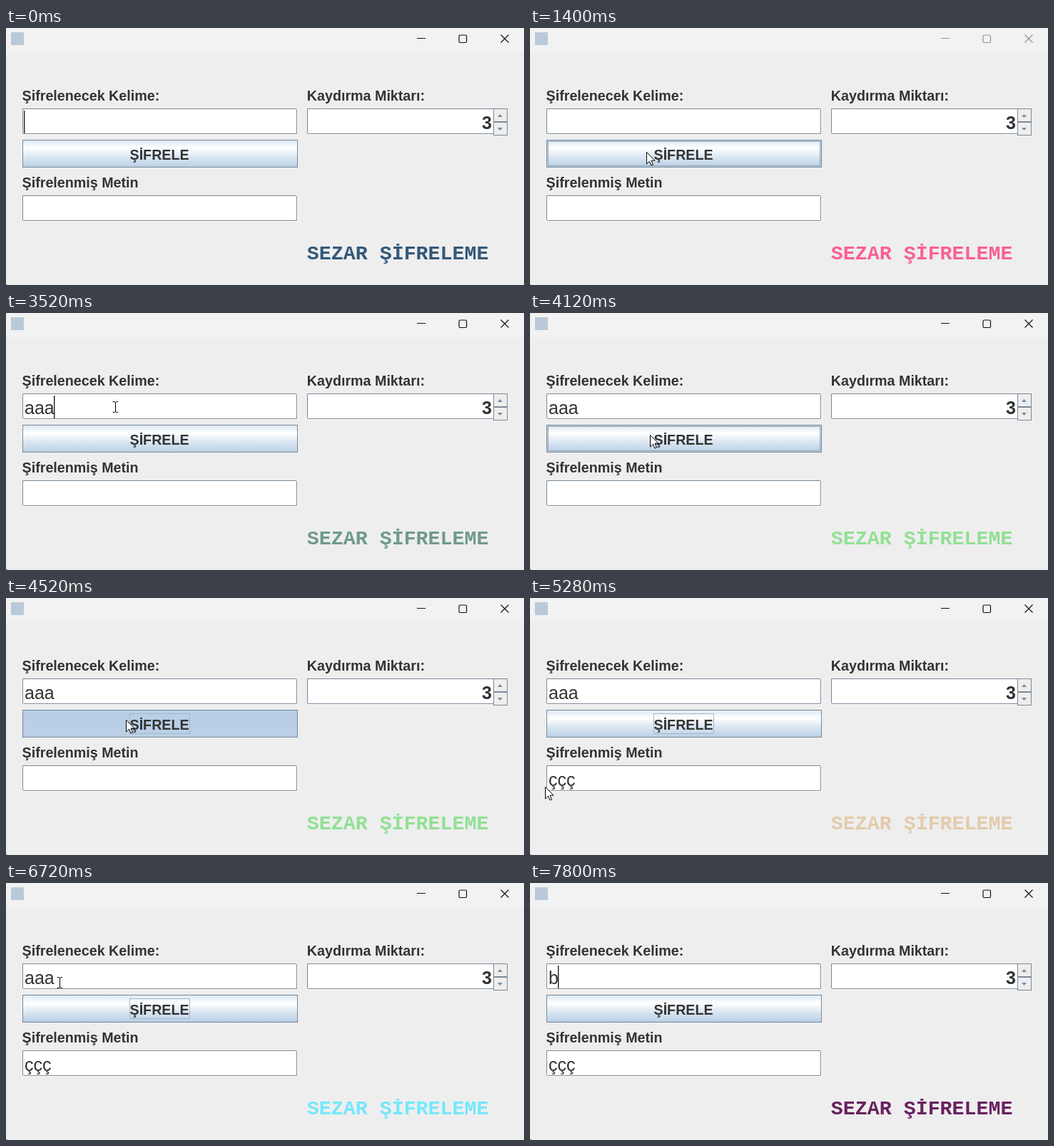
An HTML page that plays this animation: 726x361 px, repeating every 8 s.

```html
<!DOCTYPE html>
<html lang="tr">
<head>
<meta charset="utf-8">
<title>Sezar</title>
<style>
  html, body { margin: 0; width: 100%; height: 100%; overflow: hidden; background: #eee; }
  svg { display: block; width: 726px; height: 361px; }
  text { fill: #333; white-space: pre; }
  .label { font: bold 19.7px "Liberation Sans", Arial, sans-serif; }
  .value { font: 25px "Liberation Sans", Arial, sans-serif; }
  .bold { font-weight: bold; }
  .heading { font: bold 28.3px "Liberation Mono", "DejaVu Sans Mono", monospace; }
  .edge { stroke: #7a8a99; }
  .line { fill: none; }
</style>
</head>
<body>
<svg viewBox="0 0 726 361">
  <defs>
    <linearGradient id="metal" x2="0" y2="1">
      <stop stop-color="#dde8f3"/>
      <stop offset=".3" stop-color="#fff"/>
      <stop offset=".6" stop-color="#dde8f3"/>
      <stop offset="1" stop-color="#b8cfe5"/>
    </linearGradient>
  </defs>

  <rect width="726" height="361" fill="#eee"/>
  <rect width="726" height="34" fill="#f2f2f2"/>
  <rect x="7" y="6" width="18" height="18" fill="#b9c9d9"/>
  <g id="controls" class="line" stroke-width="1.2">
    <path d="M576 14.500h12M693.500 9.500l11 11m0-11l-11 11"/>
    <rect x="635" y="10" width="10.500" height="10.500" rx="1.500"/>
  </g>
  <path id="corner" d="M0 358Q0 361 3 361H0z"/>

  <text class="label" x="22.600" y="102">Şifrelenecek Kelime:</text>
  <text class="label" x="421.800" y="102">Kaydırma Miktarı:</text>
  <text class="label" x="22.600" y="224">Şifrelenmiş Metin</text>

  <g id="fields"></g>
  <g class="edge" fill="#eee">
    <rect x="683.500" y="113.500" width="19" height="18"/>
    <rect x="683.500" y="132.500" width="19" height="18"/>
  </g>
  <path d="M689 125l3.500-4 3.500 4zM689 140h7l-3.500 4z" fill="#7a8a99"/>
  <text class="value bold" x="667" y="142">3</text>

  <rect id="button" class="edge" x="23.500" y="157.500" width="385" height="38"/>
  <g id="hover" class="line">
    <rect x="24.500" y="158.500" width="383" height="36" stroke="#b8cfe5"/>
    <rect x="25.500" y="159.500" width="381" height="34" stroke="#7a8a99" stroke-opacity=".65"/>
  </g>
  <rect id="ring" class="line" x="173.500" y="162.500" width="84" height="28" stroke="#a3b8cc"/>
  <text class="label" x="173.500" y="185">ŞİFRELE</text>

  <rect id="selection" y="116" height="31" fill="#b8cfe5"/>
  <text id="input" class="value" x="26" y="142"></text>
  <rect id="caret" y="116" width="1.400" height="32" fill="#222"/>
  <text id="output" class="value" x="26" y="264"></text>
  <text id="heading" class="heading" x="421.800" y="325">SEZAR ŞİFRELEME</text>

  <g id="pointer">
    <path id="arrow" d="M.5.5V17L4.500 13.200 7 19 9.500 18 7 12.200H12z" fill="#fff" stroke="#000"/>
    <path id="beam" class="line" d="M-3.500-7.500H-1L.5-6.500 2-7.500H4M.5-6.500V6.500M-3.500 7.500H-1L.5 6.500 2 7.500H4" stroke="#000"/>
  </g>
</svg>
<script>
const LOOP = 8000, SECOND = 1000, BLINK = 500;
const TEXT_X = 26, CHAR = 13.9;
const $ = Object.fromEntries([...document.querySelectorAll('[id]')].map(e => [e.id, e]));

// The heading takes a new colour every second.
const COLOR_DELAY = 600;
const colors = ['#34587a', '#fa5f96', '#7f5fad', '#6f9a8f', '#92e094',
  '#e3cbab', '#96a08c', '#73e8fb', '#68215f'];

const DEACTIVATE = 280, REACTIVATE = 2000;
const PRESS = 4520, RELEASE = 4640;
const DRAG = 6880, DRAG_END = 7280, REPLACE = 7800;
const keys = [2880, 3120, 3520];
const caretResets = [0, REACTIVATE, ...keys, DRAG, 7100, REPLACE];

// Each move eases from the previous stop to its own.
const ENTER = { end: 440, x: 215, y: 318 };
const moves = [
  { start: 440, end: 800, x: 189, y: 224 },
  { start: 1000, end: 1400, x: 163, y: 174 },
  { start: 1600, end: 2120, x: 153, y: 132 },
  { start: 3560, end: 4120, x: 168, y: 171 },
  { start: RELEASE, end: 5120, x: 21, y: 265 },
  { start: 5280, end: 5800, x: 62, y: 263 },
  { start: 6000, end: 6120, x: 68, y: 180 },
  { start: 6320, end: 6720, x: 75, y: 140 },
  { start: DRAG, end: DRAG_END, x: -14, y: 138 },
];

const clamp = (v, low, high) => Math.max(low, Math.min(high, v));
const ease = k => k * k * (3 - 2 * k);
const between = (v, low, high) => v >= low && v < high;
const inside = ({ x, y }, left, top, right, bottom) =>
  between(x, left, right) && between(y, top, bottom);
const show = (el, on) => el.setAttribute('visibility', on ? 'visible' : 'hidden');
const set = (el, name, value) => el.setAttribute(name, value);

// Sunken box with open corners at top right and bottom left.
function field(x, y, width) {
  const right = x + width, bottom = y + 36;
  return `<path d="M${x} ${y}H${right}V${bottom}H${x}z" fill="#fff"/>
    <path class="line edge" d="M${x + .5} ${bottom - 1}V${y + .5}H${right - 1}
      M${x + 1} ${bottom - .5}H${right - .5}V${y + 1}"/>
    <path class="line" stroke="#fff" d="M${x + 1} ${bottom + .5}H${right + .5}V${y + 1}"/>`;
}
$.fields.innerHTML = field(23, 113, 385) + field(23, 235, 385) + field(422, 113, 262);

function pointerAt(t) {
  let { x, y } = ENTER;
  for (const move of moves) {
    const k = ease(clamp((t - move.start) / (move.end - move.start), 0, 1));
    x += (move.x - x) * k;
    y += (move.y - y) * k;
  }
  return { x: Math.round(x), y: Math.round(y) };
}

function render(t) {
  const active = !between(t, DEACTIVATE, REACTIVATE);
  set($.controls, 'stroke', active ? '#111' : '#929292');
  set($.corner, 'fill', active ? '#777' : '#aaa');
  set($.heading, 'style', `fill:${colors[Math.ceil((t - COLOR_DELAY + 1) / SECOND)]}`);

  const point = pointerAt(t);
  const visible = between(t, ENTER.end, DRAG_END);
  const dragging = t >= DRAG;
  const useBeam = dragging || inside(point, 23, 113, 408, 149) || inside(point, 23, 235, 408, 271);
  set($.pointer, 'transform', `translate(${point.x} ${point.y})`);
  show($.arrow, visible && !useBeam);
  show($.beam, visible && useBeam);

  const pressed = between(t, PRESS, RELEASE);
  const buttonFocus = between(t, PRESS, DRAG);
  set($.button, 'fill', pressed ? '#b8cfe5' : 'url(#metal)');
  show($.hover, visible && !dragging && !pressed && inside(point, 23, 157, 409, 196));
  show($.ring, buttonFocus);

  const text = t >= REPLACE ? 'b' : 'a'.repeat(keys.filter(key => key <= t).length);
  $.input.textContent = text;
  $.output.textContent = t >= RELEASE ? 'ççç' : '';

  const selecting = between(t, DRAG, REPLACE);
  const column = selecting
    ? clamp(Math.round((point.x - TEXT_X) / CHAR), 0, text.length)
    : text.length;
  set($.selection, 'x', TEXT_X + column * CHAR);
  set($.selection, 'width', (text.length - column) * CHAR);
  show($.selection, selecting);

  const sinceReset = t - caretResets.findLast(reset => reset <= t);
  const lit = sinceReset % (2 * BLINK) < BLINK;
  set($.caret, 'x', TEXT_X - 1 + Math.round(column * CHAR));
  show($.caret, active && !buttonFocus && lit);
}

const start = performance.now();
function tick() {
  render((performance.now() - start) % LOOP);
  requestAnimationFrame(tick);
}
tick();
</script>
</body>
</html>
```
